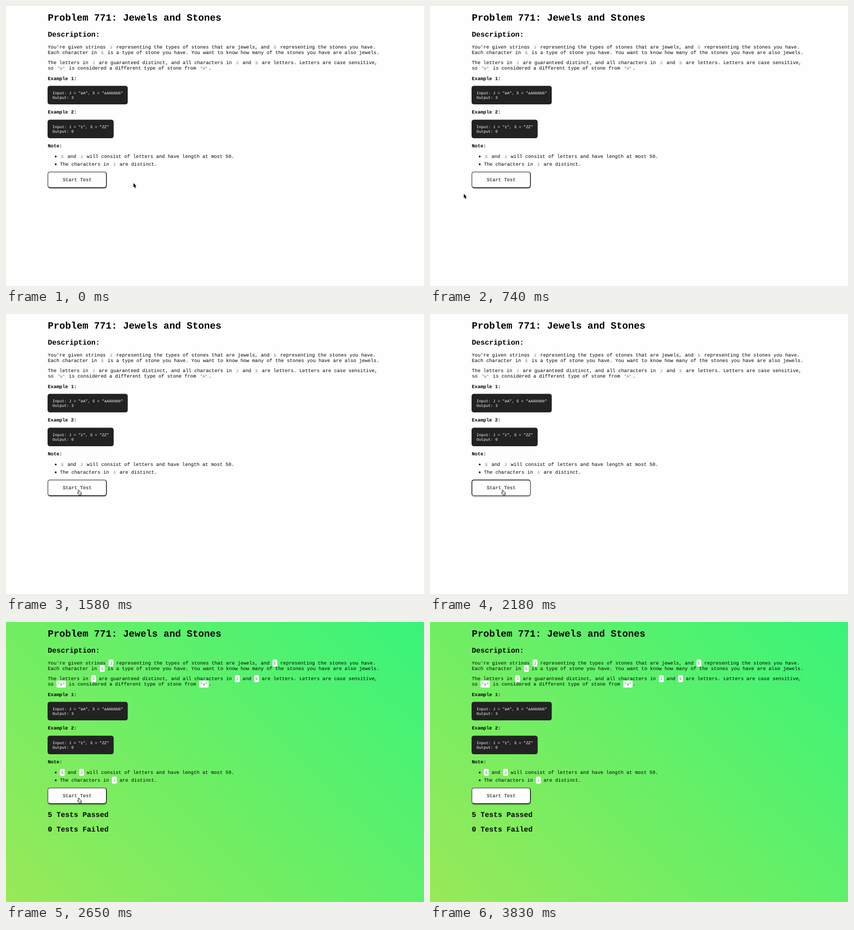
Write an HTML page that moves like this. It is 915 px wide and 612 px high and loops after 4.59 s.

```html
<!DOCTYPE html>
<html lang="en">
<head>
<meta charset="utf-8">
<title>Jewels and Stones</title>
<style>
html, body { margin: 0; width: 100%; height: 100%; overflow: hidden; background: #fefefe; }
svg { display: block; }
text { font-family: "Liberation Mono", monospace; white-space: pre; text-rendering: geometricPrecision; }
.code { fill: #f7fbfd; }
.done .code { fill: #fcfefd; }
#backdrop, #results { visibility: hidden; }
.done #backdrop, .done #results { visibility: visible; }
.edge { fill: none; stroke-width: 1.4; }
#topLeft { stroke: #555; }
#bottomRight { stroke: #000; }
.pressed #topLeft { stroke: #000; }
.pressed #bottomRight { stroke: #555; }
</style>
</head>
<body>
<svg id="stage" width="915" height="612" viewBox="0 0 915 612">
  <defs>
    <linearGradient id="green" gradientUnits="userSpaceOnUse" x1="76" y1="688" x2="839" y2="-76">
      <stop offset="0" stop-color="#99e958"/>
      <stop offset=".5" stop-color="#68ef66"/>
      <stop offset="1" stop-color="#38f47a"/>
    </linearGradient>
    <filter id="soft" x="-10%" y="-30%" width="120%" height="160%"><feGaussianBlur stdDeviation="1.1"/></filter>
  </defs>
  <rect id="backdrop" width="915" height="612" fill="url(#green)"/>
  <g id="page"></g>
  <g id="button">
    <rect x="91.5" y="364" width="128.5" height="35.2" rx="5" opacity=".42" filter="url(#soft)"/>
    <rect x="91.5" y="362.5" width="128.5" height="35" rx="5" fill="#fefefe"/>
    <path id="topLeft" class="edge" d="M93 395.6Q91.7 394.3 91.7 392V367.7Q91.7 362.7 96.7 362.7H214.7Q217 362.7 218.4 364"/>
    <path id="bottomRight" class="edge" d="M218.4 364Q219.7 365.4 219.7 367.7V392Q219.7 397 214.7 397H96.7Q94.4 397 93 395.6"/>
  </g>
  <g id="results"></g>
  <path id="arrow" d="M0 0V9.3L2.1 7.4L3.7 11L5.4 10.3L3.8 6.7H6.6Z" stroke="#fff" stroke-width="1" paint-order="stroke"/>
  <g id="hand" fill="#fff" stroke="#000" stroke-width=".9" stroke-linejoin="round">
    <path d="M3.3.5Q4.5.5 4.7 1.9L5.2 4.5Q6.2 4 6.8 4.9Q7.8 4.5 8.3 5.4Q9.5 5.2 9.7 6.6Q9.9 8.6 8.9 10V11.6H4.3Q3.4 9.8 1 7.5Q.3 6.3 1.5 6.1L3.1 7.2L2.2 2Q2.1.5 3.3.5Z"/>
    <path d="M5.4 7.4V9.8M6.7 7.4V9.8M8 7.4V9.8" stroke-width=".5"/>
  </g>
</svg>
<script>
const LEFT = 91.5, BODY = 10.56, CODE = 8.58, PAD = 2.64, ADVANCE = 0.6;
const byId = id => document.getElementById(id);
const page = byId('page'), results = byId('results'), stage = byId('stage');

function add(parent, tag, attrs, content = '') {
  const node = document.createElementNS('http://www.w3.org/2000/svg', tag);
  for (const key in attrs) node.setAttribute(key, attrs[key]);
  node.textContent = content;
  return parent.appendChild(node);
}

function label(parent, x, y, size, content, weight = 400, fill = '#000') {
  return add(parent, 'text', { x, y, 'font-size': size, 'font-weight': weight, fill }, content);
}

// Backticks mark inline code.
function line(x, y, content) {
  content.split('`').forEach((part, i) => {
    const isCode = i % 2, size = isCode ? CODE : BODY;
    const width = part.length * size * ADVANCE + (isCode ? 2 * PAD : 0);
    if (isCode) {
      add(page, 'rect', { class: 'code', x, y: y - 11, width, height: 15.2, rx: 2 });
      label(page, x + PAD, y - 0.3, size, part, 400, '#546e7a');
    } else label(page, x, y, size, part);
    x += width;
  });
}

function block(y, width, rows) {
  add(page, 'rect', { x: 91, y, width, height: 40.6, rx: 5, fill: '#222' });
  rows.forEach((row, i) => label(page, 101.8, y + 18.4 + i * 9.8, CODE, row, 400, '#fff'));
}

label(page, LEFT, 32, 21.12, 'Problem 771: Jewels and Stones', 700);
label(page, LEFT, 66.5, 15.84, 'Description:', 700);
line(LEFT, 93, "You're given strings `J` representing the types of stones that are jewels, and `S` representing the stones you have.");
line(LEFT, 104.8, 'Each character in `S` is a type of stone you have. You want to know how many of the stones you have are also jewels.');
line(LEFT, 127.3, 'The letters in `J` are guaranteed distinct, and all characters in `J` and `S` are letters. Letters are case sensitive,');
line(LEFT, 139.1, 'so `"a"` is considered a different type of stone from `"A"`.');
label(page, LEFT, 161.5, BODY, 'Example 1:', 700);
block(174.5, 175.5, ['Input: J = "aA", S = "aAAbbbb"', 'Output: 3']);
label(page, LEFT, 235.3, BODY, 'Example 2:', 700);
block(248.5, 144.7, ['Input: J = "z", S = "ZZ"', 'Output: 0']);
label(page, LEFT, 309.4, BODY, 'Note:', 700);
[[332, '`S` and `J` will consist of letters and have length at most 50.'],
 [349.1, 'The characters in `J` are distinct.']].forEach(([y, content]) => {
  add(page, 'circle', { cx: 108.8, cy: y - 3.1, r: 1.9 });
  line(LEFT + 26.4, y, content);
});
label(byId('button'), 124.2, 383.2, BODY, 'Start Test');
const passed = label(results, LEFT, 425.9, 15.84, '', 700);
label(results, LEFT, 457.5, 15.84, '0 Tests Failed', 700);

// The pointer jumps between sampled positions: time, x, y.
const pointer = [
  [0, 279, 387], [180, 235.5, 399.3], [360, 176, 431], [475, 134, 447], [590, 109.5, 452],
  [740, 74, 410.7], [880, 78, 411.5], [1000, 94, 396], [1115, 112, 376], [1235, 136, 365],
  [1350, 155, 389.5], [1470, 155.2, 386], [1580, 155.5, 384],
  [3010, 420, 462], [3125, 655, 508.5], [3240, 703, 507.3],
  [3480, 722, 516], [3600, 790, 556], [3715, 853.5, 598], [3830, -50, -50]
];

function render(now) {
  const t = now % 4590;
  const [, x, y] = pointer.findLast(p => p[0] <= t);
  const over = x > 90 && x < 220 && y > 361 && y < 397;
  byId('arrow').setAttribute('visibility', over ? 'hidden' : 'visible');
  byId('hand').setAttribute('visibility', over ? 'visible' : 'hidden');
  byId(over ? 'hand' : 'arrow').setAttribute('transform', `translate(${x} ${y})`);
  stage.classList.toggle('pressed', t >= 2180 && t < 2320);
  stage.classList.toggle('done', t >= 2320);
  passed.textContent = `${t < 2440 ? 2 : t < 2650 ? 4 : 5} Tests Passed`;
}

const start = performance.now();
function tick() {
  render(performance.now() - start);
  requestAnimationFrame(tick);
}
tick();
</script>
</body>
</html>
```
